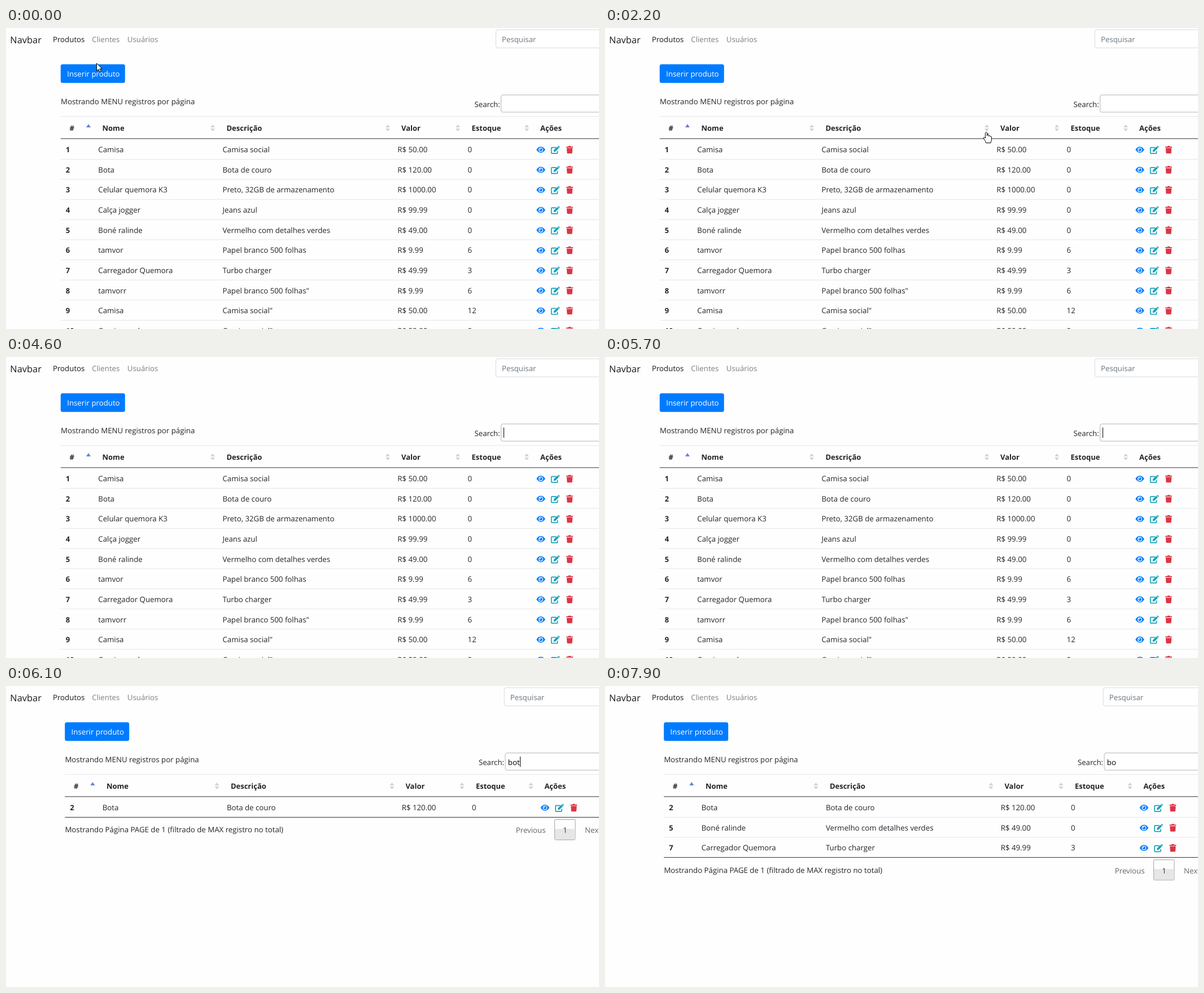
Recreate the animation shown at these times as an HTML page with a canvas. Size 1050x533 px, loop 8 s.

```html
<!DOCTYPE html>
<html lang="pt-BR">
<head>
<meta charset="utf-8">
<style>
html, body { margin: 0; width: 100%; height: 100%; overflow: hidden; background: #fefefe; }
canvas { display: block; }
</style>
</head>
<body>
<canvas id="stage" width="1050" height="533"></canvas>
<script>
const ctx = document.getElementById('stage').getContext('2d');
const DURATION = 8000, TICK = 100;
// The page is shown slightly reduced, so one page pixel is HAIR wide.
const HAIR = .8688, ROW = 41 * HAIR, BODY_TOP = 226 * HAIR;
const INK = '#212529', RULE = '#dee2e6', DARK_RULE = '#111', BLUE = '#007bff', TEAL = '#17a2b8', RED = '#dc3545';
const REGULAR = '13.25px "Open Sans", sans-serif';
const BOLD = 'bold 13px "Open Sans", sans-serif';
const BRAND = '16.4px "Open Sans", sans-serif';

const products = [
  ['Camisa', 'Camisa social', '50.00', 0],
  ['Bota', 'Bota de couro', '120.00', 0],
  ['Celular quemora K3', 'Preto, 32GB de armazenamento', '1000.00', 0],
  ['Calça jogger', 'Jeans azul', '99.99', 0],
  ['Boné ralinde', 'Vermelho com detalhes verdes', '49.00', 0],
  ['tamvor', 'Papel branco 500 folhas', '9.99', 6],
  ['Carregador Quemora', 'Turbo charger', '49.99', 3],
  ['tamvorr', 'Papel branco 500 folhas"', '9.99', 6],
  ['Camisa', 'Camisa social"', '50.00', 12],
  ['Camisa azul', 'Camisa social"', '50.00', 0],
].map(([name, description, price, stock], i) => ({ id: i + 1, name, description, price, stock }));

const columns = [['#', 112.5], ['Nome', 170.5, 366], ['Descrição', 390.5, 676],
  ['Valor', 700, 800], ['Estoque', 824.5, 922], ['Ações', 946]];

// [time, value]
const typing = [[0, ''], [5800, 'b'], [6000, 'bo'], [6100, 'bot'], [6500, 'bota'], [7600, 'bot'], [7900, 'bo']];
// [on, off]
const caretSpans = [[4600, 5200], [5700, 6300], [6800, 7300], [7800, 7900]];
// [time, x, y]
const pointerPath = [[0, 160, 62], [300, 70, 24], [400, 41, 19], [600, 62, 70], [700, 90, 110],
  [900, 241, 134], [1800, 349, 152], [2000, 556, 167], [2100, 556, 167], [2200, 675, 184],
  [2400, 750, 194], [2700, 885, 170], [2800, 917, 140], [3000, 905, 101], [3300, 862, 44],
  [3500, 840, 51], [3600, 795, 66], [3900, 937, 128]];
const POINTER_END = 4000;

const arrowShape = new Path2D('M.5 .5V14L3.7 11 6 16.2 8.3 15.2 6 10.2H10.2Z');
const handShape = new Path2D('M-1.6 11V1.8Q0-.8 1.6 1.8V7Q3-.0 4.4 5.5 4.4 7.5 4.4 7.6 5.8 5.6 7 7.8 9 7 9.4 9V14Q8.6 16.5 8 19.5H-.5Q-1 16.5-3.6 13.2L-5.2 10.8Q-4.4 8.2-1.6 11Z');
const beamShape = new Path2D('M-3.5-7.5H-1L0-6.5 1-7.5H3.5M0-6.5V6.5M-3.5 7.5H-1L0 6.5 1 7.5H3.5');
const eyeShape = new Path2D('M-7.8 0C-3.8-7.2 3.8-7.2 7.8 0C3.8 7.2-3.8 7.2-7.8 0Z');
const pageShape = new Path2D('M1.5-4.5H-5.8Q-6.8-4.5-6.8-3.5V5Q-6.8 6-5.8 6H3Q4 6 4 5V1.6');
const pencilShape = new Path2D('M-3.4 3.2L-3 .2 3.2-6 5.9-3.3-.4 2.9ZM3.9-6.6L4.7-7.2Q5.5-7.6 6.2-6.9L7.2-5.9Q7.9-5.2 7.2-4.5L6.6-3.9Z');
const trashShape = new Path2D('M-6-5.6H-2.6L-1.8-6.8H1.8L2.6-5.6H6V-3.9H-6ZM-5.2-3H5.2L4.6 5.6Q4.5 6.7 3.4 6.7H-3.4Q-4.5 6.7-4.6 5.6Z');

function text(value, x, y, color = INK, font = REGULAR) {
  ctx.font = font;
  ctx.fillStyle = color;
  ctx.fillText(value, x, y);
}

function rect(x, y, w, h, color) {
  ctx.fillStyle = color;
  ctx.fillRect(x, y, w, h);
}

function rule(x, y, color) {
  rect(x, y, 1050, HAIR, color);
}

function roundBox(x, y, w, h, r, fill, stroke) {
  ctx.beginPath();
  ctx.roundRect(x, y, w, h, r);
  ctx.fillStyle = fill;
  ctx.fill();
  if (!stroke) return;
  ctx.lineWidth = HAIR;
  ctx.strokeStyle = stroke;
  ctx.stroke();
}

function dot(x, y, r, color) {
  ctx.beginPath();
  ctx.arc(x, y, r, 0, 2 * Math.PI);
  ctx.fillStyle = color;
  ctx.fill();
}

function shape(path, x, y, fill, stroke, width = 1) {
  ctx.save();
  ctx.translate(x, y);
  if (fill) { ctx.fillStyle = fill; ctx.fill(path); }
  if (stroke) { ctx.strokeStyle = stroke; ctx.lineWidth = width; ctx.stroke(path); }
  ctx.restore();
}

function triangle(x, y, height, color) {
  ctx.beginPath();
  ctx.moveTo(x - 4, y);
  ctx.lineTo(x + 4, y);
  ctx.lineTo(x, y - height);
  ctx.fillStyle = color;
  ctx.fill();
}

function actionIcons(x, y) {
  shape(eyeShape, x, y, BLUE);
  dot(x, y, 3.9, '#fff');
  dot(x, y, 2.7, BLUE);
  dot(x - 1.1, y - 1.1, 1, '#fff');
  shape(pageShape, x + 25.5, y + .5, null, TEAL, 1.7);
  shape(pencilShape, x + 26, y + .5, TEAL);
  shape(trashShape, x + 51, y, RED);
}

function navigation(shift) {
  text('Navbar', 7.3, 26.5, 'rgba(0,0,0,.9)', BRAND);
  text('Produtos', 83, 25, 'rgba(0,0,0,.9)');
  text('Clientes', 152.3, 25, 'rgba(0,0,0,.5)');
  text('Usuários', 214.8, 25, 'rgba(0,0,0,.5)');
  const x = 867 + shift * 2;
  roundBox(x + HAIR / 2, 3.1, 220, 32.1, 3.5, '#fff', '#ced4da');
  text('Pesquisar', x + 11, 25, '#6c757d');
}

function searchField(query, caret, shift) {
  text('Search:', 829.5 + shift, 139.7);
  roundBox(876.6 + shift, 118.6, 220, 30.4, 3, '#fff', '#aaa');
  const x = 881.4 + shift;
  text(query, x, 139.7, '#000');
  if (caret) rect(Math.round(x + ctx.measureText(query).width), 125, 1, 18, '#000');
}

function tableHead(shift, left) {
  rule(left, 180 * HAIR, RULE);
  for (const [label, x, sortX] of columns) {
    text(label, x + shift, 182.3, INK, BOLD);
    if (!sortX) continue;
    triangle(sortX + shift, 176, 5, '#d3d3d6');
    triangle(sortX + shift, 178, -5, '#d3d3d6');
  }
  triangle(146 + shift, 176, 6, '#6b80d6');
  rule(left, BODY_TOP - HAIR, DARK_RULE);
}

function tableRow(item, index, shift, left) {
  const top = BODY_TOP + index * ROW;
  const baseline = top + 23.9;
  if (index) rule(left, top, RULE);
  text(item.id, 105.8 + shift, baseline, INK, BOLD);
  text(item.name, 163.3 + shift, baseline);
  text(item.description, 383.5 + shift, baseline);
  text('R$ ' + item.price, 693.3 + shift, baseline);
  text(item.stock, 817.6 + shift, baseline);
  actionIcons(947 + shift, baseline - 4.7);
}

function tableFooter(count, shift, left) {
  const y = BODY_TOP + count * ROW;
  rule(left, y, DARK_RULE);
  text('Mostrando Página PAGE de 1 (filtrado de MAX registro no total)', 97 + shift, y + 27.5);
  text('Previous', 902.8, y + 28.3, '#666');
  roundBox(971.5, y + 4.5, 36.5, 36, 2, '#fdfdfd', '#979797');
  rect(972, y + 21, 35.5, 19, '#e6e6e6');
  text('1', 986.2, y + 28.3, '#333');
  text('Next', 1025, y + 28.3, '#666');
}

function pointer(t) {
  const next = pointerPath.findIndex(point => point[0] > t);
  const to = pointerPath.at(next), from = pointerPath.at(next < 0 ? -1 : next - 1);
  const k = to === from ? 0 : (t - from[0]) / (to[0] - from[0]);
  const x = from[1] + (to[1] - from[1]) * k;
  const y = from[2] + (to[2] - from[2]) * k;
  if (y > 156 && y < 196) shape(handShape, x, y, '#fff', '#000');
  else if (x > 876 && y > 118 && y < 149) shape(beamShape, x, y, null, '#000');
  else shape(arrowShape, x, y, '#fff', '#000');
}

function draw(t) {
  const query = typing.findLast(([start]) => start <= t)[1];
  const caret = caretSpans.some(([on, off]) => t >= on && t < off);
  const matches = products.filter(p => `${p.name} ${p.description}`.toLowerCase().includes(query));
  // The page widens when its scrollbar disappears.
  const shift = query ? 7.4 : 0;
  const left = 96.8 + shift;

  ctx.textRendering = 'geometricPrecision';
  rect(0, 0, 1050, 533, '#fefefe');
  navigation(shift);
  roundBox(left, 74 * HAIR, 114, 38 * HAIR, 3.5, BLUE);
  text('Inserir produto', 108.2 + shift, 86.4, '#fff');
  text('Mostrando MENU registros por página', 97 + shift, 134.7);
  searchField(query, caret, shift);
  tableHead(shift, left);
  matches.forEach((item, i) => tableRow(item, i, shift, left));
  if (query) tableFooter(matches.length, shift, left);
  if (t < POINTER_END) pointer(t);
}

function frame() {
  const t = performance.now() % DURATION;
  draw(Math.floor(t / TICK) * TICK);
  requestAnimationFrame(frame);
}
frame();
</script>
</body>
</html>
```
